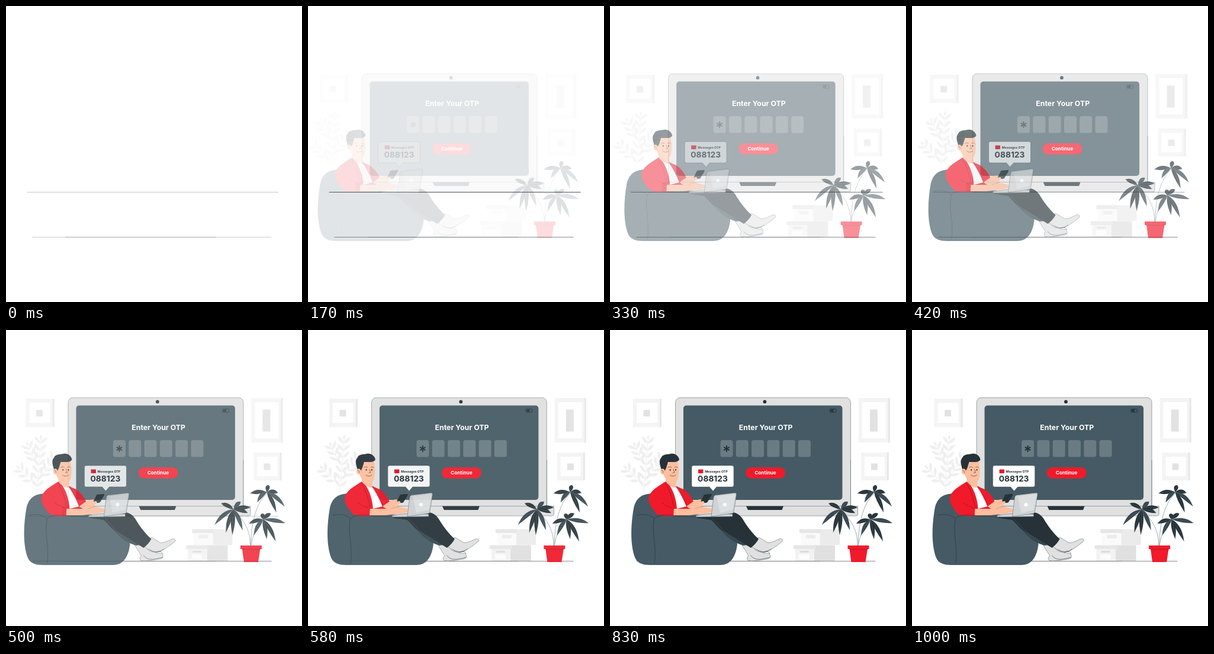
Animation, 500 px wide and 500 px high, one loop 1040 ms. Source, as an HTML page:

```html
<!DOCTYPE html>
<html lang="en">
<head>
<meta charset="utf-8">
<title>Enter Your OTP</title>
<style>
  html, body { margin: 0; width: 100%; height: 100%; overflow: hidden; background: #fff; }
  svg { display: block; width: 100vw; height: 100vh; font-family: Inter, "Open Sans", sans-serif; font-weight: 700; }
  .layer { opacity: 0; }
  .slate { fill: #455a64; }
  .dark { fill: #263238; }
  .red { fill: #f01a2b; }
  .skin { fill: #ffbe9d; }
  .metal { fill: #e0e0e0; }
  .white { fill: #fff; }
  .line { fill: none; stroke: #263238; stroke-width: .6; stroke-linecap: round; stroke-linejoin: round; }
  .edge { stroke: #455a64; stroke-width: .5; }
</style>
</head>
<body>
<svg viewBox="0 0 500 500">
  <path id="desk" d="M35.5 314.5H460.5" stroke="#3c4043" stroke-width=".9"/>
  <path id="ground" d="M44.5 390.5H448.5" stroke="#3c4043" stroke-width=".8"/>
  <path d="M100 390.5H355" stroke="#3c4043" stroke-width=".8" opacity=".35"/>

  <g id="scene">
    <g class="layer">
      <g id="pictures"></g>
      <g id="shrub" fill="#efefef"></g>
    </g>

    <g class="layer">
      <path class="metal" d="M320 336.500H388V363H323V343H320Z" fill-opacity=".65"/>
      <path d="M323 343H355V363H323Z" fill="#fafafa"/>
      <path d="M320 336.500H356V343H320Z" fill="#e6e6e6"/>
      <path d="M331 346H347V352H331Z" fill="#ececec"/>
      <path class="metal" d="M345 363.500H380V390H345Z"/>
      <path d="M313 370H345V390H313Z" fill="#f2f2f2"/>
      <path d="M310 363.500H348V370H310Z" fill="#e6e6e6"/>
      <path d="M321 373H336V376H321Z" fill="#dcdcdc"/>
      <path d="M319 379H337V387H319Z" fill="#fcfcfc"/>
    </g>

    <g class="layer">
      <rect class="metal edge" x="110.500" y="114.300" width="296" height="190" rx="8"/>
      <path class="metal" d="M100 297.500H419V311Q419 314 415 314H100Z"/>
      <path d="M110.500 297.500H418.500V311Q418.500 314 415 314H110M406.500 220V297" class="line" style="stroke:#455a64;stroke-width:.5"/>
      <rect class="slate" x="124" y="127.500" width="268.500" height="159.500" rx="5"/>
      <path class="dark" d="M230 297.500H293L290.500 304H233Z"/>
      <circle class="dark" cx="261.400" cy="121.200" r="2.900"/>
      <rect x="371.500" y="133.500" width="10.500" height="5.500" rx="1.300" fill="none" stroke="#263238"/>
      <rect class="dark" x="372.500" y="134.500" width="5" height="3.500"/>
      <text class="white" x="263.200" y="169" font-size="12.300" text-anchor="middle">Enter Your OTP</text>
      <g id="slots" fill="#fff" fill-opacity=".2"></g>
      <path d="M197 195V206M192.300 197.800L201.700 203.200M201.700 197.800L192.300 203.200" stroke="#263238" stroke-width="2"/>
      <rect class="red" x="229.300" y="232" width="66.700" height="18.700" rx="9.300"/>
      <text class="white" x="262.500" y="243.800" font-size="8.200" text-anchor="middle">Continue</text>
    </g>

    <g class="layer">
      <path d="M418 366Q420 330 389 304M419 366Q420 300 446 276M419 366Q423 336 440 321" class="line" style="stroke:#8a979c;stroke-width:.8"/>
      <g id="plant"></g>
      <path class="red" d="M401.500 364H437.500V370H435L431.500 392H407.500L404.500 370H401.500Z"/>
      <path d="M404.500 370.300H435" class="line" style="stroke:#a81422;stroke-width:.8"/>
    </g>

    <g class="layer">
      <!-- shoes -->
      <g class="metal edge">
        <path d="M222 362L239 361L246 372C253 376 262 376 269 378C272 381 271 386 266 387C255 388 245 391 236 390C230 389 231 385 234 381Z"/>
        <path d="M251 350L237 365L247 371C253 374 258 375 266 374C276 369 284 363 291 357C293 354 290 352 286 353C278 357 271 360 266 359Z"/>
      </g>
      <path class="line" d="M259 376C263 372 269 374 270 378M238 381C244 389 252 389 270 384M248 371C258 378 264 375 272 370"/>

      <!-- bean bag -->
      <path class="slate" d="M72 276C53 277 44 284 40 301C35 330 34 362 42 384C46 394 55 397 68 397H186C202 397 212 386 215 362C213 346 197 326 178 316L110 306Z"/>
      <!-- legs -->
      <path d="M178 318C186 341 202 357 225 364L240 362L215 336Z" fill="#37474f"/>
      <path class="dark" d="M145 317L205 308C214 308 219 312 224 319C231 331 240 343 251 353C248 359 243 364 238 368C220 357 206 347 193 341C184 337 179 328 171 321Z"/>
      <path class="line" d="M174 320C184 327 186 337 199 344" style="stroke:#455a64"/>

      <!-- torso -->
      <path class="red" d="M94 256C83 263 73 268 67 278C63 286 66 294 72 302L79 311C91 316 103 314 114 314L143 299C139 287 131 274 124 270L111 263Z"/>
      <path class="white" d="M98 259L112 264C119 276 125 287 129 298L113 302C112 286 107 270 98 259Z"/>
      <path class="skin" d="M94 248L112 254L112 266C106 267 100 263 94 256Z"/>
      <path class="red" d="M111 264L124 269C132 275 139 284 144 296L130 300C127 287 120 275 111 264Z"/>
      <path class="line" d="M107 302C101 298 93 297 88 292M94 259C101 272 105 283 108 299M112 265C119 276 125 286 130 299" style="stroke:#8f111b"/>

      <!-- head -->
      <path class="skin" d="M90 225L114 221C117 232 117 244 114 253C111 260 97 259 92 248L89 241Z"/>
      <path class="dark" d="M84 225C83 218 87 216 88 213C94 209 99 210 103 209C110 208 116 213 117 219C114 224 107 223 98 223C96 229 95 235 92 238L89 241C86 235 85 230 84 225Z"/>
      <ellipse class="skin" cx="88.800" cy="239" rx="3.600" ry="4.800"/>
      <path class="line" d="M87 237Q90 237 90 241M98 232Q101 230 104 232M109 232Q111 230 114 232M107 235L109 241H106M101 245Q106 249 111 245"/>
      <g class="dark"><ellipse cx="101.700" cy="236.300" rx="1" ry="1.400"/><ellipse cx="111" cy="236.300" rx="1" ry="1.400"/></g>

      <!-- phone, arms, laptop -->
      <path class="skin" d="M129 298L143 288L152 286C155 287 157 288 158 291L153 299L137 303Z"/>
      <path class="dark" d="M159 278L170 277C172 277 172 278 171 280L165 290C164 292 162 292 160 292H152Z"/>
      <path class="skin" d="M151 290L158 289Q161 292 157 294L149 296Z"/>
      <path class="skin" d="M107 302L143 302L156 298L171 302L174 307L161 310L134 313L107 313Z"/>
      <path class="red" d="M72 296C83 301 96 301 108 302L107 313L79 311Z"/>
      <path class="line" d="M107 302V313M143 302L156 298" style="stroke:#9e5a4c;stroke-width:.4"/>
      <path class="edge" d="M146 313L171 310L207 311V315L144 316Z" fill="#d2d5d7"/>
      <path class="edge" d="M178 279L211 275Q214 275 213.500 278L209 307Q208.500 310 206 310L171 315L175 282Q175.500 279.500 178 279Z" fill="#cfd2d4"/>
      <path d="M180 281L212 277L207 304L186 309Z" fill="#dcdfe0"/>
      <circle class="white" cx="194" cy="295" r="3"/>

      <path class="line" d="M75 394C80 368 69 340 75 319C80 311 98 312 112 314C132 315 150 315 169 319M75 319C69 312 57 310 45 313"/>
    </g>

    <g class="layer">
      <path class="white edge" d="M141 229H206Q209 229 209 232V262Q209 265 206 265H180L174 272L168 265H141Q138 265 138 262V232Q138 229 141 229Z"/>
      <rect class="red" x="149" y="235.500" width="8.500" height="6.500" rx="1"/>
      <path d="M149.500 236.500L153.200 239.300L157 236.500" class="line" style="stroke:#a81422;stroke-width:.5"/>
      <text class="dark" x="179.500" y="240.900" font-size="5.300" text-anchor="middle">Messages OTP</text>
      <text class="dark" x="173.500" y="256.200" font-size="13.800" text-anchor="middle">088123</text>
    </g>
  </g>
</svg>

<script>
const $ = id => document.getElementById(id);
const rect = (x, y, w, h, fill, rx = 0) =>
  `<rect x="${x}" y="${y}" width="${w}" height="${h}" rx="${rx}" ${fill ? `fill="${fill}"` : ''}/>`;

// Wall pictures: frame box, then the size of the motif in the middle.
$('pictures').innerHTML = [
  [39, 116, 48, 48, 11, 11],
  [420, 115, 53, 75, 13, 37],
  [424, 207, 47, 47, 11, 11]
].map(([x, y, w, h, mw, mh]) =>
  rect(x, y, w, h, '#f4f4f4') + rect(x + w - 3, y, 3, h, '#e7e7e7') +
  rect(x + 6, y + 7, w - 13, h - 14, '#fff') +
  rect(x + (w - mw) / 2 - 1, y + (h - mh) / 2 + .5, mw, mh, '#e2e2e2')
).join('');

$('slots').innerHTML = Array.from({ length: 6 }, (_, i) =>
  rect(186.500 + i * 26.300, 186, 21, 28.500, '', 3.500)).join('');

// A pointed leaf from base to tip; sag bends it downwards.
function leaf(x, y, tx, ty, width, sag = 0) {
  const dx = tx - x, dy = ty - y, len = Math.hypot(dx, dy);
  const nx = -dy / len * width, ny = dx / len * width;
  const mx = x + dx * .55, my = y + dy * .55 - sag;
  return `M${x} ${y}Q${mx + nx} ${my + ny} ${tx} ${ty}Q${mx - nx} ${my - ny} ${x} ${y}Z`;
}

const twigs = [
  [57, 277, 64, 186],
  [57, 263, 29, 235],
  [60, 255, 87, 216],
  [58, 230, 43, 197]
];
$('shrub').innerHTML = twigs.map(([x, y, tx, ty]) => {
  const angle = Math.atan2(ty - y, tx - x), len = Math.hypot(tx - x, ty - y);
  const count = Math.round(len / 13);
  let d = leaf(tx, ty, tx + 9 * Math.cos(angle), ty + 9 * Math.sin(angle), 4);
  for (let i = 1; i <= count; i++) {
    const f = i / (count + .5), px = x + (tx - x) * f, py = y + (ty - y) * f;
    for (const side of [-.75, .75]) {
      const a = angle + side;
      d += leaf(px, py, px + 16 * Math.cos(a), py + 16 * Math.sin(a), 5);
    }
  }
  return `<path d="${d}"/><path d="M${x} ${y}L${tx} ${ty}" stroke="#efefef"/>`;
}).join('');

// Each cluster: centre, then the leaf tips.
const clusters = [
  [390, 303, [[369, 293], [402, 290], [418, 300], [414, 309], [358, 329], [377, 342], [388, 346], [405, 338]]],
  [446, 274, [[418, 276], [430, 291], [449, 262], [465, 275], [476, 298], [462, 308]]],
  [440, 320, [[416, 327], [424, 347], [438, 310], [453, 310], [477, 326], [461, 357], [446, 353]]]
];
$('plant').innerHTML = clusters.map(([x, y, tips]) => tips.map(([tx, ty], i) => {
  const sag = ty > y + 10 ? 8 : 3;
  const fill = i % 3 === 1 ? '#37474f' : '#263238';
  return `<path d="${leaf(x, y, tx, ty, 7, sag)}" fill="${fill}"/>` +
    `<path d="M${x} ${y}Q${x + (tx - x) * .55} ${y + (ty - y) * .55 - sag} ${tx} ${ty}" ` +
    `fill="none" stroke="#607078" stroke-width=".4"/>`;
}).join('')).join('');

const LOOP = 1040, FPS = 24;
const layers = document.querySelectorAll('.layer');
const start = performance.now();

function draw() {
  const t = Math.floor((performance.now() - start) % LOOP / 10) * 10;
  const step = Math.floor((t + 9.9) * FPS / 1000);
  const begun = step >= 2;
  const p = Math.min(1, step / 16.5);
  const alpha = begun ? p * p * (3 - 2 * p) : 0;
  const shift = -23.7 * (1 - Math.cos((step - 20) * Math.PI / 36));

  for (const layer of layers) layer.style.opacity = alpha;
  $('scene').setAttribute('transform', `translate(${shift.toFixed(2)} 0)`);
  $('desk').style.opacity = begun ? Math.max(0, Math.min(1, (14 - step) / 8)) : .32;
  $('ground').style.opacity = begun ? .75 : .32;
  requestAnimationFrame(draw);
}
draw();
</script>
</body>
</html>
```
